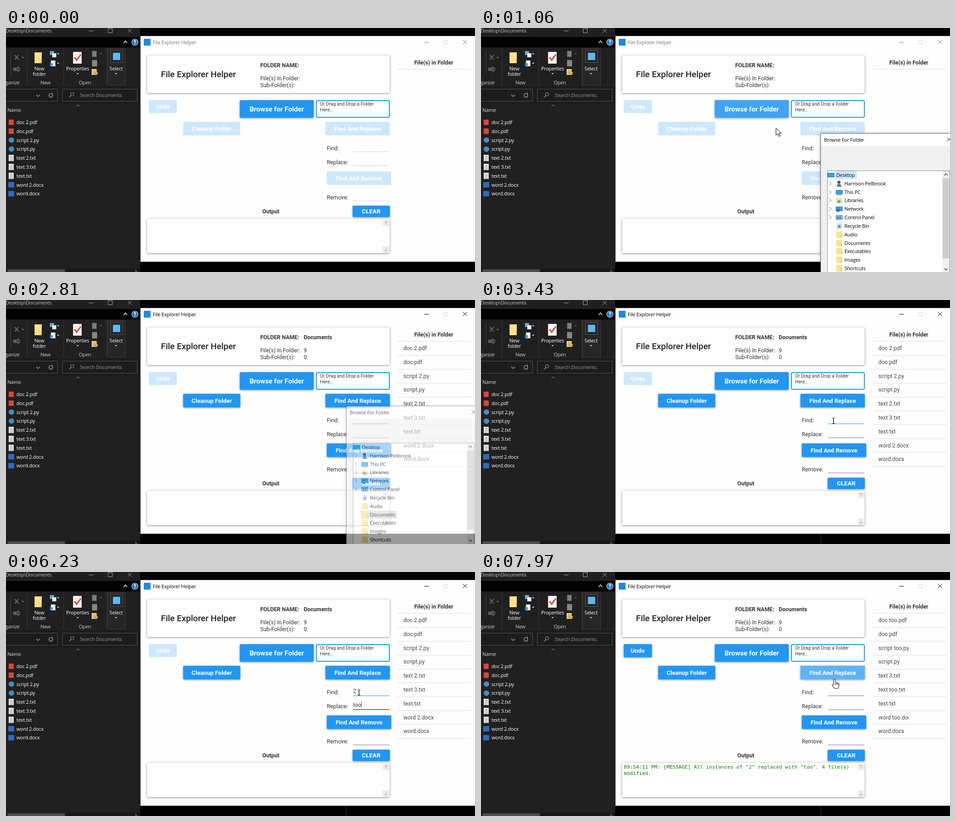
These frames come from a looping animation (1035 by 541 pixels, 8 s). An HTML page with a canvas:

```html
<!DOCTYPE html>
<html lang="en">
<head>
<meta charset="utf-8">
<title>File Explorer Helper</title>
<style>
html, body { margin: 0; width: 100%; height: 100%; overflow: hidden; background: #000; }
canvas { display: block; }
</style>
</head>
<body>
<canvas id="stage" width="1035" height="541"></canvas>
<script>
const W = 1035, H = 541, LOOP = 8000;
const main = document.getElementById('stage').getContext('2d');
const layer = Object.assign(document.createElement('canvas'), { width: 1100, height: 600 });
const layerCtx = layer.getContext('2d');
let c = main;

const BLUE = '#2196f3', INK = '#333';
const UI = '11px "Open Sans", "Noto Sans", sans-serif';
const roboto = (size, weight = 400) => `${weight} ${size}px Roboto, sans-serif`;
const BODY = roboto(12.3), STRONG = roboto(12.3, 600);
const MONO = '11.18px "DejaVu Sans Mono", monospace';

const clamp = v => Math.max(0, Math.min(1, v));
const ramp = (t, a, b) => clamp((t - a) / (b - a));
const ease = p => p * p * (3 - 2 * p);

// ---------- drawing helpers ----------
function text(s, x, y, font = UI, color = '#fff', align = 'left') {
  c.font = font;
  c.letterSpacing = font === UI ? '-0.25px' : '0px';
  c.fillStyle = color;
  c.textAlign = align;
  c.fillText(s, x, y);
}
function rect(x, y, w, h, color) {
  c.fillStyle = color;
  c.fillRect(x, y, w, h);
}
function frame(x, y, w, h, color, width = 1) {
  c.strokeStyle = color;
  c.lineWidth = width;
  c.strokeRect(x, y, w, h);
}
function line(color, width, ...p) {
  c.strokeStyle = color;
  c.lineWidth = width;
  c.beginPath();
  for (let i = 0; i < p.length; i += 2) c.lineTo(p[i], p[i + 1]);
  c.stroke();
}
function poly(fill, ...p) {
  c.fillStyle = fill;
  c.beginPath();
  for (let i = 0; i < p.length; i += 2) c.lineTo(p[i], p[i + 1]);
  c.closePath();
  c.fill();
}
function disc(x, y, r, color) {
  c.fillStyle = color;
  c.beginPath();
  c.arc(x, y, r, 0, 7);
  c.fill();
}
function raised(x, y, w, h, color, blur = 4) {
  c.save();
  c.shadowColor = 'rgba(0,0,0,.45)';
  c.shadowBlur = blur;
  c.shadowOffsetY = blur ? 1 : 0;
  c.fillStyle = color;
  c.beginPath();
  c.roundRect(x, y, w, h, 2);
  c.fill();
  c.restore();
}
const cross = (x, y, r, color) => {
  line(color, 1, x - r, y - r, x + r, y + r);
  line(color, 1, x + r, y - r, x - r, y + r);
};
const drop = (x, y, color = '#ddd') => poly(color, x - 2.5, y - 1, x + 2.5, y - 1, x, y + 2);
const chevron = (x, y, w, h, color, width = 1.3) => line(color, width, x - w, y - h, x, y + h, x + w, y - h);

function page(x, y, w, h, color = '#eee') {
  rect(x, y, w, h, color);
  for (let i = 3; i < h - 1; i += 3) rect(x + 2, y + i, w - 4, 1, '#888');
}
function folder(x, y, w, h) {
  rect(x, y, w, h, '#ffe08c');
  rect(x + w * .85, y + h * .55, w * .15, h * .45, '#eec45a');
}

// ---------- dark file window ----------
const FILES = ['doc 2.pdf', 'doc.pdf', 'script 2.py', 'script.py', 'text 2.txt',
  'text 3.txt', 'text.txt', 'word 2.docx', 'word.docx'];
const RENAMED = ['doc too.pdf', 'doc.pdf', 'script too.py', 'script.py', 'text 3.txt',
  'text too.txt', 'text.txt', 'word too.docx', 'word.docx'];

function fileIcon(name, y) {
  if (name.endsWith('pdf')) rect(6, y - 6, 11, 12, '#d9492f');
  else if (name.endsWith('py')) disc(12, y, 6, '#4b8bbe');
  else if (name.endsWith('txt')) page(6, y - 7, 11, 14);
  else rect(5, y - 6, 13, 12, '#2b6cc4');
}

function explorer() {
  rect(0, 0, 296, H, '#202020');
  rect(0, 20, 296, 23, '#000');
  text('Desktop\\Documents', -1, 10, UI, '#c4c4c4');
  rect(183, 6, 10, 1, '#aaa');
  frame(225.5, 1.5, 9, 9, '#aaa');
  cross(273, 6, 4.5, '#aaa');
  chevron(263.5, 31, 4, -2.5, '#ccc', 2);
  disc(284.5, 31.5, 7.5, '#cfe6f8');
  disc(284.5, 31.5, 6.5, '#1479c9');
  text('?', 284.5, 36, roboto(12, 700), '#fff', 'center');

  for (const x of [46.5, 127.5, 222.5]) line('#3c3c3c', 1, x, 45, x, 126);
  line('#4a4a4a', 1, 10.5, 52, 10.5, 104);
  line('#666', 2, 19, 60, 28, 70);
  line('#666', 2, 28, 60, 19, 70);
  drop(37, 65, '#888');
  frame(16.5, 88.5, 14, 6, '#888');
  rect(18, 90, 6, 3, '#777');
  line('#999', 1, 26.5, 85, 26.5, 99);
  text('Organize', -14, 125, UI, '#ccc');

  folder(63, 54, 16, 24);
  text('New', 73.5, 94, UI, '#fff', 'center');
  text('folder', 73.5, 106, UI, '#fff', 'center');
  text('New', 87, 125, UI, '#ccc', 'center');
  rect(97, 51, 9, 9, '#5ea9dd');
  rect(102, 56, 9, 9, '#e8f2fa');
  rect(99, 72, 10, 13, '#f0f0f0');
  rect(97, 78, 6, 6, '#3d8fd0');
  drop(115, 57);
  drop(115, 78);

  rect(148, 53, 19, 26, '#f4f4f4');
  line('#e04a2f', 3, 151, 65, 156, 71, 165, 59);
  text('Properties', 158, 94, UI, '#fff', 'center');
  drop(158, 101);
  page(190, 51, 10, 13, '#777');
  drop(209, 57, '#666');
  page(190, 71, 11, 14, '#888');
  page(189, 91, 11, 13, '#e9d79a');
  disc(198, 100, 4.5, '#e7a93b');
  text('Open', 174, 125, UI, '#ccc', 'center');

  rect(225, 46, 39, 81, '#262626');
  frame(224.5, 45.5, 39, 81, '#414141');
  frame(230.5, 49.5, 27, 27, '#5a5a5a');
  rect(236, 55, 16, 16, '#5fb8f5');
  text('Select', 243, 94, UI, '#fff', 'center');
  drop(243, 101);

  rect(0, 130, 296, 38, '#1c1c1c');
  frame(-1, 135.5, 114.5, 27, '#555');
  frame(124.5, 135.5, 165, 27, '#555');
  chevron(71, 150, 4, 2, '#999', 1.5);
  c.beginPath();
  c.arc(99, 149.5, 4, -.6, 4.6);
  c.strokeStyle = '#aaa';
  c.lineWidth = 1.5;
  c.stroke();
  poly('#aaa', 99, 144, 103, 144, 103, 148);
  c.beginPath();
  c.arc(146, 147, 3.5, 0, 7);
  c.strokeStyle = '#999';
  c.lineWidth = 1.1;
  c.stroke();
  line('#999', 1.2, 143.5, 149.5, 139, 154);
  text('Search Documents', 163, 153, UI, '#999');

  rect(0, 168, 296, H, '#202020');
  chevron(159, 172, 3.5, -2, '#999', 1);
  text('Name', 3, 186, UI, '#ddd');
  FILES.forEach((name, i) => {
    const y = 209 + i * 19.8;
    fileIcon(name, y);
    text(name, 23, Math.round(y + 4));
  });
  rect(0, 534, 296, 7, '#171717');
  rect(3, 535, 127, 6, '#4d4d4d');
  line('#999', 1.2, 285, 537, 288, 540, 285, 543);
}

// ---------- light application window ----------
function button(label, x, y, w, h, on, size = 13.15, wave) {
  raised(x, y, w, h, on ? BLUE : '#cde8fd', on ? (wave ? 5 : 4) : 0);
  if (wave) {
    c.save();
    c.beginPath();
    c.roundRect(x, y, w, h, 2);
    c.clip();
    disc(wave.x, wave.y, wave.r, `rgba(255,255,255,${wave.a})`);
    c.restore();
  }
  text(label, x + w / 2, y + h / 2 + size * .36, roboto(size, 600), '#fff', 'center');
}

function field(label, y, on, value = '', focus = 0, hover = false, caret = false) {
  text(label, 708, y - 3, BODY, INK);
  if (!on) c.setLineDash([2, 2]);
  line(!on ? '#aaa' : hover ? BLUE : '#757575', 1, 766, y + .5, 846, y + .5);
  c.setLineDash([]);
  if (focus > 0) rect(806 - 40 * focus, y - 1, 80 * focus, 2, BLUE);
  text(value, 766, y - 6, BODY, INK);
  if (caret) {
    c.font = BODY;
    rect(Math.round(766 + c.measureText(value).width), y - 19, 1, 15, '#2a6fb5');
  }
}

const blink = (t, since) => t >= since && Math.floor((t - since) / 530) % 2 === 0;

function scrollKey(y, dir) {
  rect(831, y, 15, 15, '#ededed');
  const m = y + 7.5;
  line('#aaa', 1, 838.5, m - 4, 838.5, m + 4);
  line('#aaa', 1, 835.5, m + dir, 838.5, m + 4 * dir, 841.5, m + dir);
}

function app(t) {
  const loaded = t >= 2740, done = t >= 7680;
  const active = loaded || (t >= 740 && t < 800);
  const ink = active ? '#000' : '#777';

  rect(297, 18, 738, 500, '#fefefe');
  frame(296.5, 17.5, 740, 501, '#444');
  rect(304, 24, 15, 15, '#1e88e5');
  text('File Explorer Helper', 324, 36, UI, ink);
  rect(923, 31, 10, 1, ink);
  frame(965.5, 27.5, 8, 8, '#d4d4d4');
  cross(1013, 31, 4.8, ink);

  raised(311.5, 61, 535, 83, '#fff', 5);
  text('File Explorer Helper', 342, 109, roboto(18.95, 500), '#222');
  text('FOLDER NAME:', 561, 87, STRONG, INK);
  text('File(s) In Folder:', 561, 116, BODY, INK);
  text('Sub-Folder(s):', 561, 131, BODY, INK);
  if (loaded) {
    text('Documents', 657, 87, STRONG, INK);
    text('9', 657, 116, BODY, INK);
    text('0', 657, 131, BODY, INK);
  }

  const browseWave = t > 740 && t < 1200 &&
    { x: 621, y: 186, r: 48 * ramp(t, 740, 870) + 90 * ramp(t, 870, 1060), a: .22 * (1 - ramp(t, 980, 1200)) };
  const replaceWave = t > 7600 &&
    { x: 779, y: 237, r: 130 * ramp(t, 7600, 7860), a: .27 };
  button('Undo', 315, 160, 62, 29, done);
  button('Browse for Folder', 516, 160, 163, 39, true, 15.1, browseWave);
  c.beginPath();
  c.roundRect(685, 161, 161, 37, 3);
  c.fillStyle = '#fff';
  c.fill();
  c.strokeStyle = BLUE;
  c.lineWidth = 2;
  c.stroke();
  text('Or Drag and Drop a Folder', 693, 172, roboto(10.35), INK);
  text('Here...', 693, 185, roboto(10.35), INK);
  button('Cleanup Folder', 391, 208, 126, 30, loaded);
  button('Find And Replace', 705, 208, 142, 30, loaded, 13.15, replaceWave);
  button('Find And Remove', 708, 318, 142, 30, loaded);
  button('CLEAR', 765, 394, 82, 25, true, 13.3);

  const swap = ramp(t, 4890, 5150), editing = t < 7600;
  const typed = done ? '' : 'too'.slice(0, (t >= 5850) + (t >= 6040) + (t >= 6230));
  const lastKey = t >= 6230 ? 6230 : t >= 6040 ? 6040 : t >= 5850 ? 5850 : 4880;
  field('Find:', 274, loaded, t >= 4460 && !done ? '2' : '',
    t < 5150 ? ease(ramp(t, 3620, 3900)) * (1 - swap) : 0,
    t > 3390 && t < 7150, t < 4880 && blink(t, t >= 4460 ? 4460 : 3660));
  field('Replace:', 305, loaded, typed, editing ? ease(swap) : 0, false,
    editing && t >= 4880 && blink(t, lastKey));
  field('Remove:', 383, loaded);

  text('Output', 584.5, 411, STRONG, INK, 'center');
  raised(311.5, 423, 535, 76, '#fff', 5);
  scrollKey(425, -1);
  scrollKey(484, 1);
  if (done) {
    text('09:54:11 PM: [MESSAGE] All instances of "2" replaced with "too". 4 file(s)', 315, 436, MONO, '#008000');
    text('modified.', 315, 450, MONO, '#008000');
  }

  text('File(s) in Folder', 944, 81, STRONG, INK, 'center');
  rect(864, 91, 162, 1, '#ddd');
  if (loaded) {
    c.save();
    c.beginPath();
    c.rect(864, 60, done ? 80 : 162, 320);
    c.clip();
    (done ? RENAMED : FILES).forEach((name, i) => text(name, 877, 111 + i * 30.8, BODY, '#444'));
    c.restore();
    FILES.forEach((_, i) => rect(864, Math.round(122.5 + i * 30.7), 162, 1, '#ddd'));
  }
  if (t > 3300) rect(749, 519, 3, 22, '#161616');
}

// ---------- folder chooser ----------
const TREE = ['Desktop', 'Harrison Pellbrook', 'This PC', 'Libraries', 'Network', 'Control Panel',
  'Recycle Bin', 'Audio', 'Documents', 'Executables', 'Images', 'Shortcuts'];

function treeIcon(i, x, y) {
  if (i > 6) return folder(x + 1, y - 7, 13, 14);
  if (i === 1) {
    disc(x + 7, y - 3, 3.5, '#555');
    poly('#4f7f78', x + 2, y + 7, x + 4, y + 1, x + 10, y + 1, x + 13, y + 7);
  } else if (i === 3) {
    folder(x, y - 5, 14, 11);
    rect(x + 4, y, 6, 6, '#4ba3dd');
  } else if (i === 6) {
    rect(x + 2, y - 6, 11, 13, '#d5dde4');
    disc(x + 7.5, y + 1, 3, '#4a93cf');
  } else {
    rect(x, y - 5, 15, 10, '#2a7ab8');
    rect(x + 1, y - 4, 13, 8, i === 5 ? '#8cc8ef' : '#2fa4ea');
    if (i === 2) rect(x + 3, y + 6, 9, 1, '#777');
    if (i === 4) disc(x + 5, y + 3, 4, '#3a76b0');
    if (i === 5) for (let k = 0; k < 4; k++) rect(x + 3 + (k % 2) * 5, y - 2 + (k >> 1) * 3, 3, 2, '#1b5c92');
  }
}

function dialog(t) {
  c.save();
  c.shadowColor = 'rgba(0,0,0,.3)';
  c.shadowBlur = 10;
  c.shadowOffsetY = 2;
  rect(750, 234, 320, 330, '#f0f0f0');
  c.restore();
  rect(750, 234, 320, 28, '#fff');
  frame(749.5, 233.5, 321, 331, '#555');
  text('Browse For Folder', 757, 252, UI, '#000');
  cross(1033, 247, 4.5, '#222');
  rect(764, 316, 271, 240, '#fff');
  frame(764.5, 316.5, 270, 240, '#828790');

  const picked = t >= 1870;
  if (!picked) rect(782, 317, 47, 18, '#cce8ff');
  const mark = t >= 2120 ? '#d9d9d9' : picked ? '#cce8ff' : t >= 1440 ? '#e5f3ff' : '';
  if (mark) rect(782, 468, 80, 18, mark);
  TREE.forEach((name, i) => {
    const y = Math.round(326 + i * 18.82);
    treeIcon(i, i ? 783 : 765, y);
    if (i > 0 && i < 6) line('#999', 1.1, 769, y - 4, 773, y, 769, y + 4);
    text(name, i ? 802 : 784, y + 4, UI, '#000');
  });
  rect(1018, 317, 16, 239, '#f0f0f0');
  rect(1019, 333, 14, 178, '#cdcdcd');
  chevron(1026, 325, 3.5, -2, '#555', 1.6);
  chevron(1026, 535, 3.5, 2, '#555', 1.6);
}

function showDialog(t) {
  const opening = t < 2000;
  const a = opening ? Math.pow(ramp(t, 790, 1000), .65) : 1 - ramp(t, 2720, 2950);
  if (a <= 0) return;
  const scale = 1 - (opening ? .04 : .025) * (1 - a);
  c = layerCtx;
  c.clearRect(0, 0, 1100, 600);
  dialog(t);
  c = main;
  c.save();
  c.globalAlpha = a;
  c.translate(910, 385);
  c.scale(scale, scale);
  c.drawImage(layer, -910, -385);
  c.restore();
  if (t >= 1460 && t < 2080) {
    rect(864, 492, 170, 18, 'rgba(0,0,0,.3)');
    rect(861, 489, 170, 18, '#fff');
    frame(861.5, 489.5, 169, 18, '#767676');
    text('Date created: 9/19/2020 9:46 PM', 866, 502, UI, '#575757');
  }
}

// ---------- pointer ----------
const ROUTE = [[30, 565, 560], [660, 621, 185], [940, 621, 185], [1480, 857, 476], [1590, 849, 468],
  [1700, 849, 468], [1740, 844, 468], [2040, 844, 468], [2170, 880, 560], [2830, 880, 560],
  [3380, 778, 268], [4440, 778, 268], [4460, 779, 267], [7110, 779, 267], [7360, 780, 238]];

function pointerAt(t) {
  let i = ROUTE.findIndex(k => k[0] > t);
  if (i < 0) i = ROUTE.length;
  if (i === 0) return [0, 700];
  const a = ROUTE[i - 1], b = ROUTE[i] || a;
  const p = b === a ? 0 : ease(ramp(t, a[0], b[0]));
  return [Math.round(a[1] + (b[1] - a[1]) * p), Math.round(a[2] + (b[2] - a[2]) * p)];
}

const ARROW = new Path2D('M0 0V16L4 12.5 6.5 18.5 9 17.5 6.5 11.5H11.5Z');
const HAND = new Path2D('M-2 1Q0-1 2 1V7Q4 6 5 8 7 7 8 9 10 8 10 11V15L8 20H0L-5 13Q-6 10-2 12Z');

function pointer(t) {
  const [x, y] = pointerAt(t);
  if (y > H) return;
  c.save();
  c.translate(x, y);
  if (t > 3350 && t < 7200) {
    line('#000', 1.4, 0, -5, 0, 6);
    for (const d of [-6, 6]) line('#000', 1, -3, d, 3, d);
  } else {
    const hand = (t > 1440 && t < 2200) || t >= 7200;
    const shape = hand ? HAND : ARROW;
    c.fillStyle = '#fff';
    c.strokeStyle = '#000';
    c.lineWidth = 1;
    c.fill(shape);
    c.stroke(shape);
    if (hand) for (const d of [2, 5, 8]) line('#000', 1, d, 8, d, 12);
  }
  c.restore();
}

function draw() {
  const t = performance.now() % LOOP;
  rect(0, 0, W, H, '#000');
  explorer();
  app(t);
  showDialog(t);
  pointer(t);
  requestAnimationFrame(draw);
}
draw();
</script>
</body>
</html>
```
